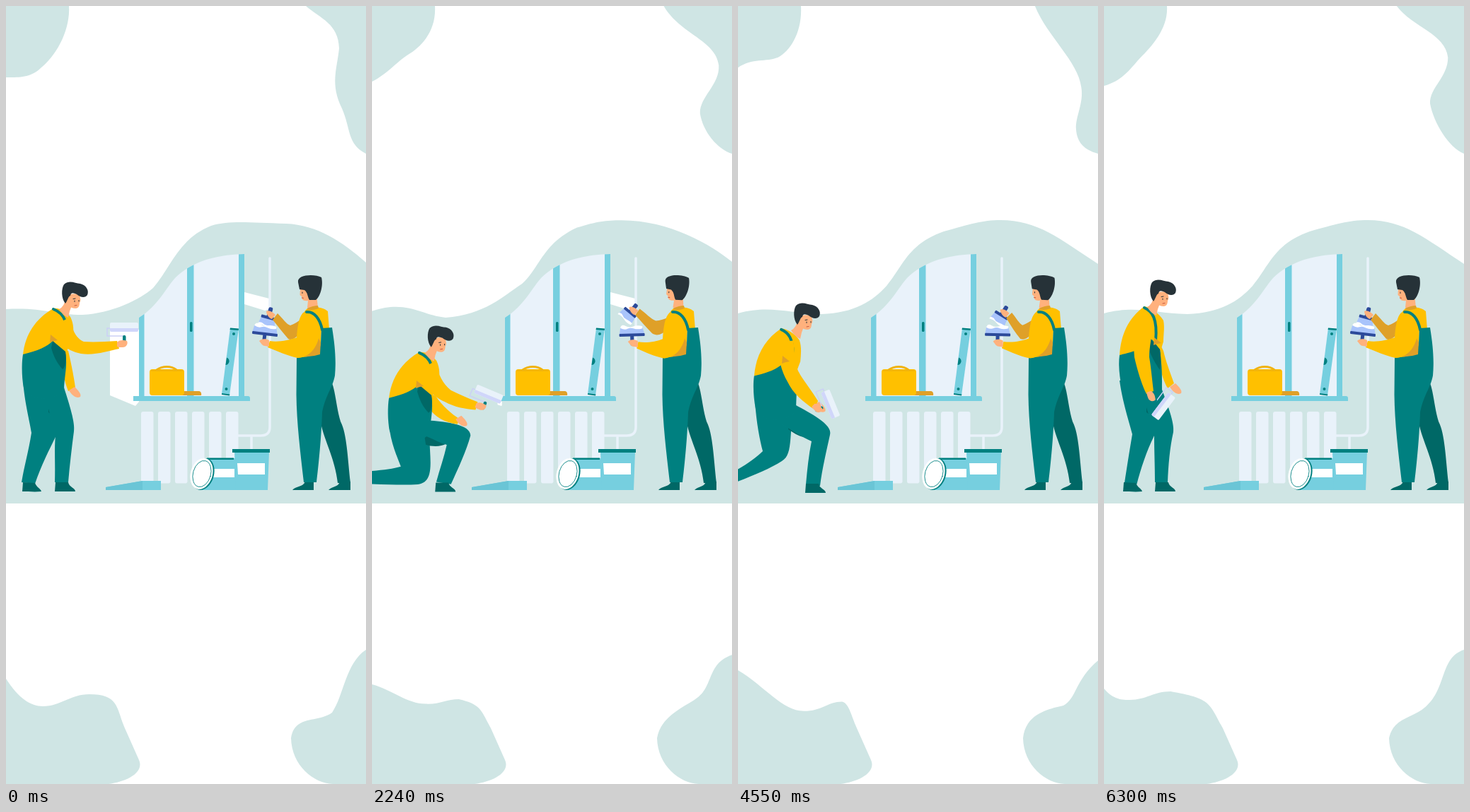
Write an HTML page that moves like this. It is 509 px wide and 1101 px high and loops after 6370 ms.

```html
<!DOCTYPE html>
<html lang="en">
<head>
<meta charset="utf-8">
<title>Renovation</title>
<style>
html, body { margin: 0; width: 100%; height: 100%; overflow: hidden; background: #fff; }
svg { display: block; width: 100%; height: 100%; }
.pale { fill: #cfe5e4; }
.glass { fill: #e9f2fa; }
.sky { fill: #76cfdf; }
.teal { fill: #008080; }
.dark { fill: #006866; }
.yellow { fill: #ffc000; }
.ochre { fill: #dfa028; }
.skin { fill: #ffb17d; }
.hair { fill: #263238; }
.white { fill: #fff; }
.navy { fill: #2c4a9a; }
.blue { fill: #a9c4fb; }
.line { fill: none; stroke-linecap: round; }
</style>
</head>
<body>
<svg viewBox="0 0 509 1101" preserveAspectRatio="none">
  <defs>
    <clipPath id="pane"><path d="M188 441C215 425 228 396 240 384C265 360 300 352 337 351V553H188Z"/></clipPath>
  </defs>
  <g class="pale">
    <path id="topLeft"/><path id="topRight"/><path id="lowLeft"/><path id="lowRight"/><path id="wall"/>
  </g>

  <!-- room -->
  <path id="leftPatch" class="white"/>
  <path id="rightPatch" class="white"/>
  <g clip-path="url(#pane)">
    <path class="glass" d="M188 350H337V553H188Z"/>
    <path class="sky" d="M188 350h7.500v203h-7.500zM256 350h9.500v203h-9.500zM329 350h8v203h-8z"/>
  </g>
  <rect class="teal" x="260" y="447" width="3.500" height="14" rx="1.500"/>
  <path class="line" stroke="#e9f2fa" stroke-width="3.500" d="M373 357V596Q373 608 360 608H328M347 608V627"/>
  <g id="fins" class="glass"></g>
  <path class="sky" d="M180 552H342Q345 552 345 555V559H180Z"/>
  <path class="ochre" d="M245 545H273Q277 546 276 551H245Z"/>
  <rect class="yellow" x="203" y="514" width="49" height="37" rx="4"/>
  <path class="line" stroke="#e8ab14" d="M205 516H250"/>
  <path class="line" stroke="#f0b310" stroke-width="3" d="M213 515C221 509 234 509 241 515"/>
  <path class="sky" d="M317 456L329 457L316 551L305 549Z"/>
  <path class="teal" d="M317 455.500L329 456.500L328.600 459L316.600 458ZM305.200 548L316.400 549.500L316 551.500L305 550Z"/>
  <g class="teal"><circle cx="322" cy="464" r="2"/><circle cx="311.500" cy="542" r="2"/><path d="M310.500 508L312 497.500Q316 499 315.500 503.500Q314 508 310.500 508Z"/></g>
  <path class="sky" d="M141 681L193 672H219V685H141Z"/>
  <path fill="#6ac5d6" d="M141 681L193 672V685H141Z"/>
  <path class="sky" d="M281 640H325V685H276Z"/>
  <path class="teal" d="M284 639.500H322V642H284Z"/>
  <path class="white" d="M292 655H323V667H291Z"/>
  <g transform="rotate(16 277 662)">
    <ellipse class="teal" cx="278.500" cy="662" rx="15.500" ry="23"/>
    <ellipse class="white" cx="276.500" cy="662" rx="15.500" ry="22.500"/>
    <ellipse class="line" stroke="#008080" stroke-width=".8" cx="277" cy="662" rx="12.500" ry="19"/>
  </g>
  <path class="sky" d="M323 631H372L370 685H325Z"/>
  <path class="teal" d="M320 627H373V632H320Z"/>
  <path class="white" d="M327 647H366V663H328Z"/>

  <!-- worker with the roller -->
  <path id="backLeg" class="teal"/>
  <path id="shade" class="dark"/>
  <path id="frontLeg" class="teal"/>
  <path id="backFoot" class="dark" d="M1 -13L18 -12C20 -6 26 -4 27 0C18 1 8 0 0 0Z"/>
  <path id="frontFoot" class="dark" d="M1 -13H19C20 -6 29 -5 29 0H0Z"/>
  <path id="farArm" class="yellow"/>
  <path id="farHand" class="skin" d="M-9 -4L-1 -9C4 -4 9 1 7 5C2 8 -4 4 -9 -4Z"/>
  <g id="torso">
    <path id="shirt" class="yellow"/><path id="bib" class="teal"/><path id="flap" class="dark"/>
    <path id="strap" class="line" stroke="#008080" stroke-width="4"/>
  </g>
  <g id="head">
    <path class="skin" d="M84 414L93 424L90 432L88 441C83 439 78 434 75 429Q83 425 84 414ZM84 408L104 407C104 412 107 416 104 420C104 425 102 428 98 428C93 428 89 425 84 420Z"/>
    <path class="hair" d="M84 421C78 414 78 400 82 394C90 387 98 393 105 393C113 395 118 402 115 409C112 414 104 412 100 408C95 406 92 405 91 410C88 411 87 417 84 421Z"/>
    <path class="line" stroke="#263238" d="M97 417v1.500M103 416.500v1.500M95 414.500l3 -.5"/>
    <path class="line" stroke="#c8553d" d="M97 424l3 -.5"/>
  </g>
  <g id="roller">
    <path class="line" stroke="#cbd0f5" stroke-width="1.500" d="M0 -5H-24V-16H-20"/>
    <rect class="glass" x="-20" y="-24" width="40" height="13" rx="2"/>
    <path fill="#d0d6fa" d="M-20 -16H20V-13Q20 -11 18 -11H-18Q-20 -11 -20 -13Z"/>
    <rect class="teal" x="-2" y="-6" width="4.500" height="12" rx="2"/>
  </g>
  <path id="nearArm" class="yellow"/>
  <path id="pit" class="ochre" d="M63 465L73 473Q66 474 62 476Z"/>
  <path id="nearHand" class="skin" d="M-8 -2C-4 -6 2 -5 6 -4C8 0 5 5 0 5C-4 5 -6 5 -8 4Z"/>

  <!-- worker with the spatulas -->
  <g id="spatula">
    <rect class="navy" x="-3" y="-15" width="6" height="15" rx="2"/>
    <path class="blue" d="M-10 0H10L12 12H-12Z"/>
    <path class="white" d="M-12 10Q-8 8 -5 10T2 11T12 10V13Q6 15 0 13T-12 13Z"/>
    <rect class="navy" x="-10.500" y="-2" width="21" height="4" rx="1"/>
  </g>
  <g id="float">
    <rect class="navy" x="-2.500" y="0" width="5" height="15" rx="2"/>
    <path class="blue" d="M-18 0L-16 -11H15L18 0Z"/>
    <path class="white" d="M-16 -10Q-10 -7 -6 -9T3 -9T15 -9V-12Q8 -14 2 -12T-9 -13T-16 -11Z"/>
    <rect class="navy" x="-18" y="-2" width="36" height="4" rx="1"/>
  </g>
  <path id="reachArm" class="ochre"/>
  <path id="reachHand" class="skin" d="M-6 -4C-2 -6 3 -3 7 1L2 7C-2 6 -6 0 -6 -4Z"/>
  <path class="dark" d="M455 524C466 535 465 560 473 588C482 605 483 640 487 675H469C465 640 450 615 445 590V550Z"/>
  <path class="dark" d="M405 685C410 679 420 681 423 673H435V685ZM456 685C462 679 470 681 472 673H487V685Z"/>
  <path class="yellow" d="M426 428C438 424 450 427 455 432L457 458H446L444 494C435 498 420 499 411 499L412 470C415 450 418 434 426 428Z"/>
  <path class="teal" d="M411 498C430 496 442 495 445 478L446 456L461 455C465 480 467 500 465 523C462 540 452 550 447 575C446 610 442 650 439 674H421C416 630 411 590 410.500 550Z"/>
  <path class="ochre" d="M423 492Q440 478 442 470L445 476L444 493Q432 497 421 496Z"/>
  <path id="holdArm" class="yellow"/>
  <path id="holdHand" class="skin" d="M7 -3C2 -6 -5 -5 -7 -2C-5 0 -3 5 1 5L7 6Z"/>
  <path class="line" stroke="#008080" stroke-width="4" d="M425 433C436 432 444 443 447 458"/>
  <g id="face">
    <path class="skin" d="M416 401L438 400L441 426C435 431 428 429 426 427L427 417C420 418 418 415 418 411L415.500 409Z"/>
    <path class="hair" d="M413 391C411 380 436 379 446 384C449 396 444 412 438 416H429C426 411 427 406 422 402L415 401Z"/>
    <path class="line" stroke="#263238" d="M419 405v1.500"/>
    <path class="line" stroke="#c8553d" d="M418.500 413l2 .3"/>
  </g>
  <path class="ochre" d="M426 428Q434 424 441 424L442 428Q434 431 426 430Z"/>
</svg>
<script>
const LOOP = 6370, STEP = 70;
const NUM = /-?\d+(\.\d+)?/g;
const tracks = [];

// order: one digit per time, the index of the pose reached then
function animate(id, attr, times, order, poses, period = LOOP) {
  const values = poses.map(p => p.match(NUM).map(Number));
  tracks.push({
    el: document.getElementById(id), attr, times, period,
    rows: [...order].map(i => values[i]), shape: poses[0]
  });
}

// monotone cubic: holds stay still and passing poses flow through
function sample({ times, rows }, t) {
  const last = times.length - 1;
  if (t <= times[0]) return rows[0];
  if (t >= times[last]) return rows[last];
  const i = times.findIndex(x => x > t) - 1;
  const h = times[i + 1] - times[i], u = (t - times[i]) / h;
  return rows[i].map((a, j) => {
    const slope = k => k < 0 || k >= last ? 0 : (rows[k + 1][j] - rows[k][j]) / (times[k + 1] - times[k]);
    const tangent = k => {
      const p = slope(k - 1), q = slope(k);
      return p * q > 0 ? 2 * p * q / (p + q) : 0;
    };
    const e = u * u * (3 - 2 * u);
    return a + (rows[i + 1][j] - a) * e
      + h * u * (1 - u) * ((1 - u) * tangent(i) - u * tangent(i + 1));
  });
}

// drifting shapes
const drift = (id, start, poses, end) => animate(id, 'd',
  [-665, 0, 490, 1190, 1680, 2835, 3500, 3990], '40123401',
  poses.map(p => start + p + end), 3500);

drift('topLeft', 'M0 0H89', [
  'C91 30 75 66 50 87C35 102 18 101 0 101',
  'C91 30 78 60 58 75C40 92 20 91 0 90',
  'C91 38 73 64 56 72C40 77 20 72 0 87',
  'C91 40 70 62 50 67C34 72 24 78 0 97',
  'C91 30 70 55 50 75C35 92 25 106 0 113'], 'Z');
drift('topRight', 'M', [
  '424 0C445 18 470 25 471 60C468 90 458 110 475 145C488 175 482 195',
  '426 0C455 22 455 55 463 80C470 110 481 125 484 150C484 175 480 198',
  '418 0C435 45 485 80 489 118C492 140 475 160 476 177C478 195 490 204',
  '412 0C435 45 488 60 492 98C494 125 468 145 469 170C472 193 490 204',
  '414 0C437 30 482 38 486 72C486 100 460 115 461 138C466 165 487 200'], ' 509 209V0Z');
drift('lowLeft', 'M0 ', [
  '952C18 980 35 991 52 991C78 991 90 974 118 974C160 974 156 994',
  '942C25 975 50 995 72 995C98 995 112 978 138 978C156 980 157 1000',
  '940C40 960 65 998 98 998C122 998 130 986 148 986C157 988 160 1004',
  '950C45 957 75 995 112 995C130 996 138 991 149 991C157 993 160 1007',
  '966C12 980 22 982 36 982C60 982 70 970 94 970C152 980 148 986'],
  ' 168 1022L188 1067C196 1085 170 1098 145 1101H0Z');
drift('lowRight', 'M509 ', [
  '911C480 930 478 975 461 1000C440 1015 408 1003',
  '917C478 950 476 985 460 1000C442 1008 410 996',
  '927C475 955 480 978 460 987C440 992 406 1003',
  '926C470 945 483 968 455 977C430 987 406 1010',
  '911C475 922 485 965 455 992C435 1010 410 1006'],
  ' 403 1036C404 1075 435 1100 462 1101H509Z');
animate('wall', 'd', [-530, 0, 600, 1170, 1700, 2300], '201201', [
  'M0 429C50 426 70 437 108 437C150 435 190 415 208 399C234 369 243 330 290 311C318 303 345 307 396 308C440 310 475 333 509 363V704H0Z',
  'M0 432C50 415 70 438 104 441C160 437 186 410 212 393C238 370 240 337 290 314C318 305 330 303 352 303C420 303 480 338 509 362V704H0Z',
  'M0 435C45 423 70 435 118 436C165 434 190 418 210 396C234 367 240 337 291 319C328 309 345 303 372 303C424 303 454 329 509 365V704H0Z'], 1700);

// roller worker; poses: reach, crouch, kneel, rise, stand
const MOVE = [0, 1120, 1750, 2500, 3850, 4550, 5110, 6300], CYCLE = '00122134';
const ARMS = [0, 1120, 1750, 2500, 3850, 5110, 6300], SWING = '0012234';
const UP = [3850, 5110], LEAN = '01';
const legs = (id, attr, order, poses) => animate(id, attr, MOVE, order, poses);
const arms = (id, attr, poses) => animate(id, attr, ARMS, SWING, poses);
const lean = (id, poses) => animate(id, 'd', UP, LEAN, poses);
const at = (x, y) => `translate(${x} ${y})`;
const turn = (x, y, a) => `translate(${x} ${y}) rotate(${a})`;

legs('backLeg', 'd', CYCLE, [
  'M24 530C26 560 34 590 36 604C32 630 26 650 22 674L41 676C50 650 60 630 72 606C74 590 76 560 82 530Z',
  'M24 560C26 590 31 615 35 630C25 640 10 650 -6 659L-8 676C20 665 45 655 62 644C80 634 70 600 82 560Z',
  'M24 600C26 625 38 645 43 657C30 660 10 660 -12 659L-12 676C20 680 45 684 66 685C100 683 78 630 84 600Z',
  'M25 535C29 565 36 595 39 611C30 635 21 655 15 678L31 682C40 662 52 645 68 628C76 615 74 590 82 535Z',
  'M22 530C26 560 36 590 40 606C36 630 32 655 29 675L46 678C52 655 60 630 71 608C76 590 78 560 82 530Z']);
legs('frontLeg', 'd', '04122134', [
  'M50 535L82 540C90 565 98 590 96 602C93 625 90 650 88 674L69 674C70 650 68 625 70 608C66 590 60 570 50 535Z',
  'M50 565L82 565C100 575 135 592 130 607C125 630 119 655 116 679L96 677C98 655 100 635 104 616C90 610 75 600 60 590Z',
  'M50 605L84 592C105 592 140 592 141 608C135 630 122 655 110 676L89 672C95 655 102 640 106 622C95 620 85 612 60 605Z',
  'M50 540L80 560C95 580 116 590 113 605C109 630 106 650 105 675L89 674C89 650 88 632 89 615C80 605 65 580 50 540Z',
  'M50 535L81 540C90 565 100 590 98 603C93 625 91 650 90 674L72 674C72 650 71 630 71 609C68 590 60 570 50 535Z']);
legs('shade', 'd', '00122100', [
  'M60 560L70 580C68 580 64 578 60 575Z',
  'M72 583L92 610C85 608 78 604 71 599Z',
  'M74 610L108 621C100 628 85 628 77 626Z']);
legs('backFoot', 'transform', CYCLE, [at(23, 687), at(-32, 680), at(-40, 680), at(12, 691), at(27, 687)]);
legs('frontFoot', 'transform', '04122134', [at(69, 687), at(95, 689), at(87, 687), at(88, 687), at(72, 687)]);
arms('farArm', 'd', [
  'M82 485L88 488C92 505 96 525 98 540L88 545C84 535 80 520 80 505Z',
  'M82 520L90 525C95 540 105 555 113 565L107 573C95 567 84 555 80 540Z',
  'M80 555L90 558C100 572 115 583 126 589L124 596C105 595 90 588 80 575Z',
  'M80 480L84 490C90 510 97 525 102 540L93 546C85 535 80 520 78 505Z',
  'M80 480L84 488C88 505 94 520 99 534L90 541C84 530 80 518 79 505Z']);
arms('farHand', 'transform', [at(98, 548), at(115, 571), at(130, 593), at(105, 549), at(102, 543)]);
legs('torso', 'transform', CYCLE, [at(0, 0), at(0, 30), at(0, 70), at(0, 8), at(0, 0)]);
legs('head', 'transform', CYCLE, [at(0, 0), at(0, 30), at(-.5, 70), at(-13, 6), at(-14, -3)]);
legs('pit', 'transform', CYCLE, [at(0, 0), at(0, 30), at(0, 74), at(8, 16), at(8, 4)]);
lean('shirt', [
  'M67 428C75 427 84 432 91 440C96 450 96 460 94 470L85 491L24 493C27 465 42 442 67 428Z',
  'M57 425C65 426 78 435 84 445C86 455 84 465 84 475L80 488L22 494C24 465 34 442 57 425Z']);
lean('bib', [
  'M24 493C45 488 58 482 66 474L84 491C87 510 83 520 82 542C70 560 35 560 25 540C22 525 22 505 24 493Z',
  'M22 494C34 491 52 488 68 472L79 486C82 510 82 520 82 542C70 560 35 560 25 540C22 525 20 508 22 494Z']);
lean('flap', [
  'M66 474L84 489C86 500 84 512 80 514C72 506 67 495 64 484Z',
  'M66 471L79 486C81 498 80 508 79 515C74 508 68 498 64 488Z']);
lean('strap', ['M67 429C75 432 81 438 84 446', 'M57 427C68 432 76 442 73 474']);
arms('nearArm', 'd', [
  'M91 440C92 455 98 470 110 475C125 476 140 475 157 474L160 485C145 488 125 495 106 492C85 488 66 472 68 452Z',
  'M91 470C92 487 98 503 110 510C125 514 140 516 154 517L155 527C138 529 120 530 104 526C85 520 66 502 68 482Z',
  'M91 510C92 525 98 540 112 552C122 558 135 565 148 571L144 583C130 581 115 577 103 569C85 560 66 542 68 522Z',
  'M68 445C72 462 66 480 67 497C73 515 78 530 83 549L73 557C62 542 50 525 45 502C42 480 45 455 52 440Z',
  'M65 440C72 458 64 475 64 497C67 515 68 530 70 545L60 549C53 535 47 515 43 497C41 475 42 455 50 436Z']);
arms('nearHand', 'transform', [turn(165, 478, 0), turn(160, 522, 5), turn(153, 578, 25), turn(79, 561, 60), turn(67, 553, 70)]);
arms('roller', 'transform', [turn(167, 472, 0), turn(163, 519, 8), turn(157, 577, 27), turn(80, 563, 105), turn(70, 556, 127)]);
animate('leftPatch', 'd', [1120, 1750, 2400], '012', [
  'M147 458H188V560L183 566L147 551Z',
  'M147 508H188V560L183 566L147 553Z',
  'M183 566H183V566L183 566L183 566Z']);

// spatula worker; poses: load, wall, scrape
const trowel = (id, attr, order, poses) => animate(id, attr, [1900, 2800, 3990, 4800], order, poses);
trowel('spatula', 'transform', '0120', [turn(371, 441, 15), turn(352, 418, 92), turn(377, 424, 90)]);
trowel('float', 'transform', '0110', [turn(366, 464, 7), turn(371, 469, -20)]);
trowel('reachArm', 'd', '0120', [
  'M384 435C392 443 396 450 402 452C408 450 412 447 418 443L416 462C410 470 404 474 399 471C392 463 385 454 377 444Z',
  'M367 415C380 421 390 427 400 432C406 435 412 436 418 437L418 452C410 454 400 454 390 447C380 438 370 429 362 423Z',
  'M398 428C400 436 402 443 403 450C408 447 412 446 418 443L416 464C412 467 408 470 400 470C393 462 390 447 387 431Z']);
trowel('reachHand', 'transform', '0120', [at(374, 436), at(360, 418), at(386, 424)]);
trowel('holdArm', 'd', '0110', [
  'M420 434C432 430 445 440 445 455C443 475 435 497 412 498C395 494 385 489 370 483L373 474C385 476 400 473 411 469C412 455 414 440 420 434Z',
  'M422 434C432 430 445 440 445 455C443 475 436 497 415 500C400 498 395 494 383 488L384 478C395 480 405 479 411 476C412 455 414 440 422 434Z']);
trowel('holdHand', 'transform', '0110', [at(365, 476), at(377, 479)]);
trowel('face', 'transform', '0110', ['rotate(0 432 418)', 'rotate(11 432 418)']);
animate('rightPatch', 'd', [2500, 2870, 3800], '012', [
  'M337 405L372 414V429L366 431L337 422Z',
  'M346 407L372 414V429L366 431L346 430Z',
  'M372 414L372 414V429L372 429L372 429Z']);

document.getElementById('fins').innerHTML = Array.from({ length: 6 }, (_, i) =>
  `<rect x="${191 + i * 24}" y="574" width="17.500" height="101.500" rx="3"/>`).join('');

function draw(now) {
  const t = Math.floor(now % LOOP / STEP) * STEP;
  for (const track of tracks) {
    const v = sample(track, t % track.period);
    let j = 0;
    track.el.setAttribute(track.attr, track.shape.replace(NUM, () => +v[j++].toFixed(2)));
  }
  requestAnimationFrame(() => draw(performance.now() - start));
}
const start = performance.now();
draw(0);
</script>
</body>
</html>
```
